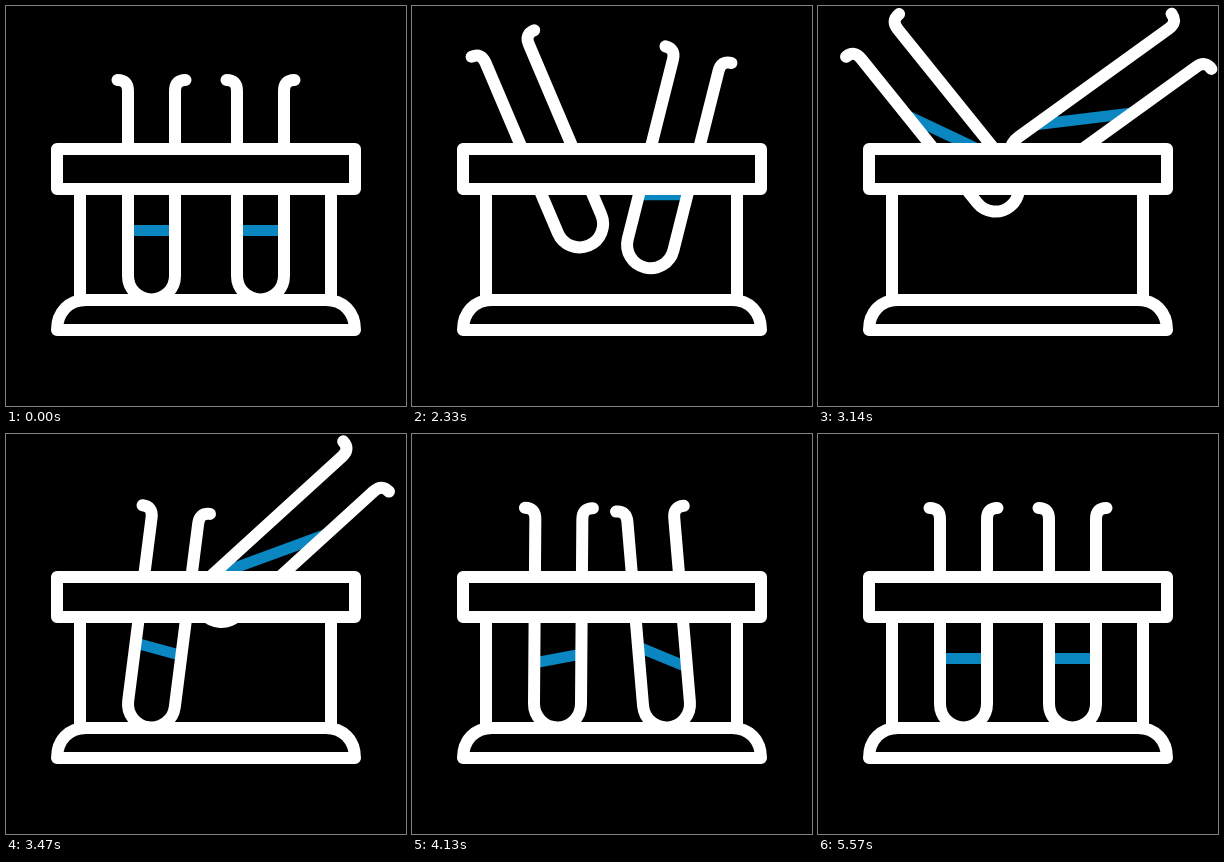
Animation, 400 px wide and 400 px high, one loop 5630 ms. Source, as an HTML page:

```html
<!DOCTYPE html>
<html lang="en">
<head>
<meta charset="utf-8">
<title>Test tubes</title>
<style>
  html, body { margin: 0; height: 100%; overflow: hidden; background: #000; }
  svg { display: block; width: 100%; height: 100%; }
</style>
</head>
<body>
<svg viewBox="0 0 400 400" fill="none" stroke="#fff" stroke-width="12" stroke-linecap="round" stroke-linejoin="round">
  <defs>
    <path id="glass" d="M-34-196Q-23.5-196-23.5-185V0A23.5 23.5 0 0 0 23.5 0V-185Q23.5-196 34-196"/>
  </defs>
  <g class="tube"><path class="liquid" stroke="#0a86c0" stroke-width="11" stroke-linecap="butt"/><use href="#glass"/></g>
  <g class="tube"><path class="liquid" stroke="#0a86c0" stroke-width="11" stroke-linecap="butt"/><use href="#glass"/></g>
  <path d="M74 183V294M325 183V294"/>
  <path d="M51 324H349C349 306 337 294 320 294H80C63 294 51 306 51 324Z"/>
  <rect x="51" y="143" width="298" height="40" fill="#000"/>
</svg>
<script>
const LOOP = 5630, START = 2030, FALL = 700, SLOSH_START = 2610;
const REST_Y = 270, LEVEL = -45.5, RADIUS = 23.5, LIFT = 120;

// rise: duration of the swing out; drop: when the tube starts to fall back;
// slosh: liquid tilt on landing, built up with the given power
const tubes = [
  { x: 145.5, lean: -53, shift: 35, rise: 660, drop: 2690, slosh: 32, power: 0.6 },
  { x: 254.5, lean: 54.2, shift: -40, rise: 900, drop: 3125, slosh: -43, power: 2.2 }
];

const clamp = v => Math.min(1, Math.max(0, v));
const smooth = u => u * u * (3 - 2 * u);
const radians = degrees => degrees * Math.PI / 180;

// How far the tube is out of the rack: eased swing out, then an accelerating fall
const swing = (tube, t) =>
  smooth(clamp((t - START) / tube.rise)) - clamp((t - tube.drop) / FALL) ** 3;

// Overshoot of the tube after landing, in degrees
const recoil = s => 8 * (s / 130) * Math.exp(1 - s / 130);

// Tilt of the liquid surface: builds up until landing, then swings and fades
function tilt(tube, t, land) {
  const built = clamp((t - SLOSH_START) / (land - SLOSH_START)) ** tube.power;
  const s = Math.max(0, t - land);
  return tube.slosh * built * Math.cos(s * Math.PI / 250) * (1 - clamp(s / 1745)) ** 2;
}

const groups = document.querySelectorAll(".tube");
const liquids = document.querySelectorAll(".liquid");

function draw(t) {
  tubes.forEach((tube, i) => {
    const land = tube.drop + FALL, sinceLand = Math.max(0, t - land);
    const out = swing(tube, t);
    const angle = tube.lean * out - Math.sign(tube.lean) * recoil(sinceLand);
    const x = tube.x + tube.shift * Math.sin(out * Math.PI / 2);
    const y = REST_Y - LIFT * out;
    const slope = RADIUS * Math.tan(radians(tilt(tube, t, land) - angle));
    const level = LEVEL - 18 * clamp((t - START) / 900) * Math.exp(-sinceLand / 130);
    groups[i].setAttribute("transform", `translate(${x} ${y}) rotate(${angle})`);
    liquids[i].setAttribute("d", `M${-RADIUS} ${level - slope}L${RADIUS} ${level + slope}`);
  });
}

const start = performance.now();
function frame() {
  draw((performance.now() - start) % LOOP);
  requestAnimationFrame(frame);
}
frame();
</script>
</body>
</html>
```
